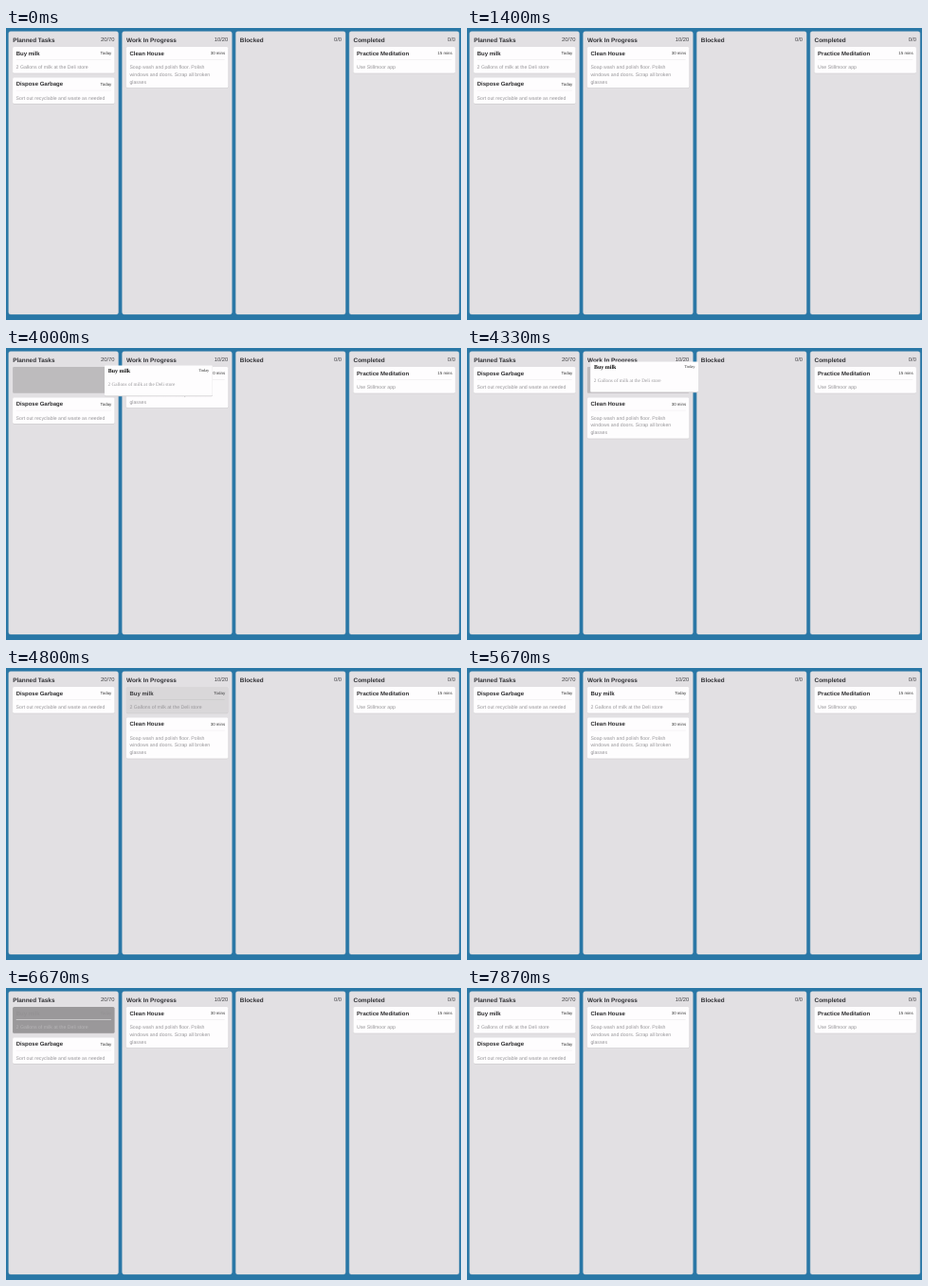
An HTML page for the animation above (8000 ms loop, 480 by 309 pixels).

```html
<!DOCTYPE html>
<html lang="en">
<head>
<meta charset="utf-8">
<title>Task board</title>
<style>
  html, body { margin: 0; width: 100%; height: 100%; overflow: hidden; background: #2977a6; }
  svg { display: block; width: 480px; height: 309px; font-family: "Liberation Sans", Arial, sans-serif; text-rendering: geometricPrecision; }
  .head { font-size: 6.4px; font-weight: bold; fill: #303034; }
  .count { font-size: 5.8px; fill: #444448; }
  .title { font-size: 6px; font-weight: bold; fill: #2c2c2e; }
  .time { font-size: 4.4px; fill: #333; }
  .desc { font-size: 5.2px; fill: #979599; }
  .count, .time { text-anchor: end; }
  .column { fill: #e2e0e3; stroke: #d2d4d9; stroke-width: .4; }
  .face { fill: #fefdfe; }
  .shade { fill: #c9c7ca; }
  .rule { fill: #f0eef0; }
  .slot { fill: #bdbbbd; }
  .ghost { font-family: "Liberation Serif", Times, serif; }
  .ghost .title { fill: #111; }
</style>
</head>
<body>
<svg id="board" viewBox="0 0 480 309"></svg>
<script>
const LOOP = 8000, TICK = 200 / 3, PITCH = 119.8, TOP = 20, SHIFT = 32.4;
const CARD_W = 107.4, CARD_H = 27.7;
const board = document.getElementById('board');

function add(parent, tag, attrs, text) {
  const el = document.createElementNS('http://www.w3.org/2000/svg', tag);
  for (const key in attrs) el.setAttribute(key, attrs[key]);
  if (text) el.textContent = text;
  parent.appendChild(el);
  return el;
}
const box = (parent, cls, x, y, width, height, rx = 0) =>
  add(parent, 'rect', { class: cls, x, y, width, height, rx });
const label = (parent, cls, x, y, text) => add(parent, 'text', { class: cls, x, y }, text);
const place = (el, x, y) => el.setAttribute('transform', `translate(${x} ${y})`);
const show = (el, on) => el.setAttribute('visibility', on ? 'visible' : 'hidden');
const cardX = col => 7.1 + col * PITCH;

function makeCard(title, time, lines) {
  const g = add(board, 'g');
  const height = CARD_H + (lines.length - 1) * 7.8;
  box(g, 'shade', 0, .5, CARD_W, height, 1.5);
  const face = box(g, 'face', 0, 0, CARD_W, height, 1.5);
  const rule = box(g, 'rule', 3.6, 13.3, 100.2, .7);
  const name = label(g, 'title', 3.6, 8.8, title);
  const when = label(g, 'time', 104.2, 8.2, time);
  const descs = lines.map((line, i) => label(g, 'desc', 3.5, 23.3 + i * 7.8, line));
  return { g, face, rule, name, when, desc: descs[0] };
}

[['Planned Tasks', '20/70'], ['Work In Progress', '10/20'], ['Blocked', '0/0'], ['Completed', '0/0']]
  .forEach(([name, count], i) => {
    const x = i * PITCH;
    box(board, 'column', 2.8 + x, 3.7, 115.7, 299.2, 2);
    label(board, 'head', 7.2 + x, 14.7, name);
    label(board, 'count', 114.5 + x, 14.3, count);
  });

const milkText = '2 Gallons of milk at the Deli store';
const milk = makeCard('Buy milk', 'Today', [milkText]);
const garbage = makeCard('Dispose Garbage', 'Today', ['Sort out recyclable and waste as needed']);
const house = makeCard('Clean House', '30 mins',
  ['Soap wash and polish floor. Polish', 'windows and doors. Scrap all broken', 'glasses']);
const practice = makeCard('Practice Meditation', '15 mins', ['Use Stillmoor app']);
place(practice.g, cardX(3), TOP);

const slot = box(board, 'slot', 0, 0, CARD_W, CARD_H, 1);
const ghost = add(board, 'g', { class: 'ghost' });
box(ghost, 'shade', 0, .5, 113.8, 32.3, 1);
box(ghost, 'face', 0, 0, 113.8, 32.2, 1);
label(ghost, 'title', 3.7, 8.1, 'Buy milk');
label(ghost, 'time', 110.3, 7, 'Today');
label(ghost, 'desc', 3.6, 21.6, milkText);

// Drag paths: time, x, y
const drags = [
  { end: 4665, path: [[3730, 11, 20], [3800, 31, 19.5], [3900, 70, 19], [4000, 104, 18.4],
                      [4130, 123, 16], [4300, 130, 14.5], [4470, 131, 14]] },
  { end: 6598, path: [[5670, 119, 20], [5800, 93, 23], [6000, 36.3, 28], [6130, 18, 24],
                      [6300, 10, 16], [6470, 7.5, 13.5]] }
];

// Where the moved card's slot sits: start time, column, row
const slots = [[0, 0, 0], [4060, 1, 0], [5930, 0, 1], [6195, 0, 0]];

// Colours after a drop: face, title, rule, description
const fade = [
  ['#7f7d7f', '#7f7d7f', '#e2e0e2', '#a8a6a8'],
  ['#9a989a', '#949294', '#dddbdd', '#b6b4b6'],
  ['#d9d7d9', '#3c3c3e', '#cbc9cb', '#979599']
];

function along(path, t) {
  const i = path.findIndex(p => p[0] > t);
  if (i < 0) return path[path.length - 1].slice(1);
  if (i === 0) return path[0].slice(1);
  const a = path[i - 1], b = path[i], k = (t - a[0]) / (b[0] - a[0]);
  return [a[1] + (b[1] - a[1]) * k, a[2] + (b[2] - a[2]) * k];
}

function draw(now) {
  const t = Math.floor((now % LOOP + 4) / TICK) * TICK;
  const drag = drags.find(d => t >= d.path[0][0] - 1 && t < d.end);
  const [, col, row] = slots.filter(s => t >= s[0]).pop();
  const x = cardX(col), y = TOP + row * SHIFT;

  place(milk.g, x, y);
  place(slot, x, y);
  place(garbage.g, cardX(0), TOP + (col === 0 && row === 0 ? SHIFT : 0));
  place(house.g, cardX(1), TOP + (col === 1 ? SHIFT : 0));
  show(milk.g, !drag);
  show(slot, drag);
  show(ghost, drag);
  if (drag) place(ghost, ...along(drag.path, t));

  const drop = drags.find(d => t >= d.end && t < d.end + 3 * TICK);
  const tones = drop ? fade[Math.floor((t - drop.end) / TICK)] : ['', '', '', ''];
  [milk.face, milk.name, milk.rule, milk.desc].forEach((el, i) => el.style.fill = tones[i]);
  milk.when.style.fill = tones[1];
}

const start = performance.now();
function frame() {
  draw(performance.now() - start);
  requestAnimationFrame(frame);
}
frame();
</script>
</body>
</html>
```
